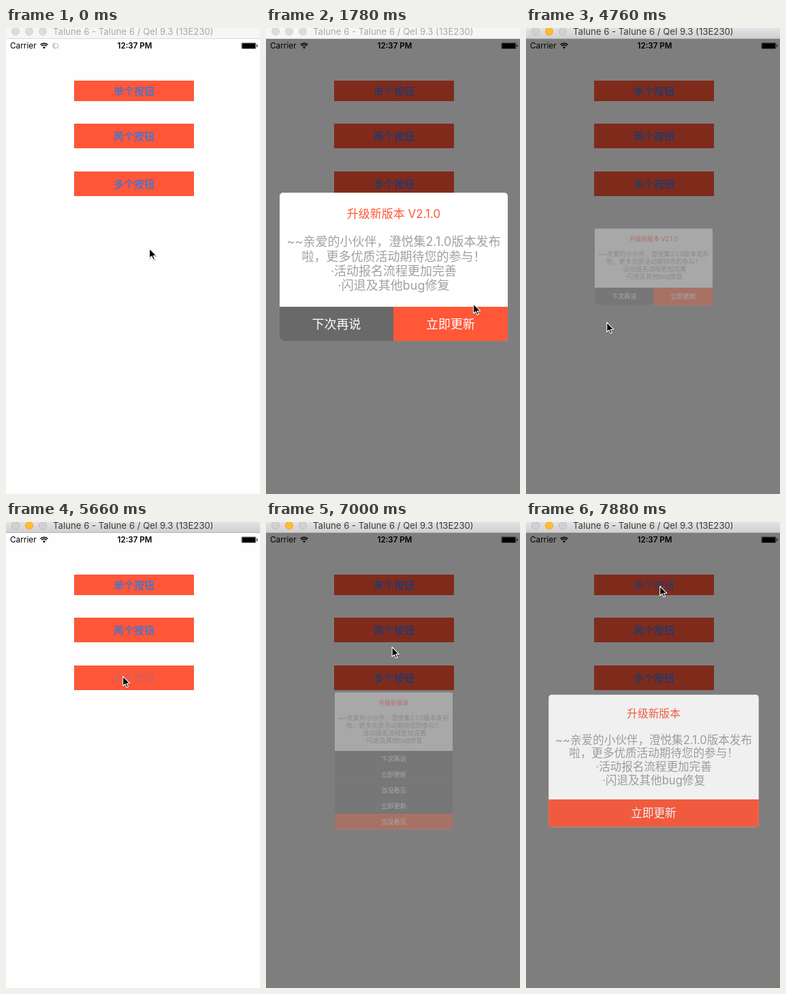
An HTML page for the animation above (8000 ms loop, 373 px wide and 682 px high).

```html
<!DOCTYPE html>
<html lang="zh-CN">
<head>
<meta charset="utf-8">
<style>
  html, body { margin: 0; width: 100%; height: 100%; overflow: hidden; background: #fefefe; }
  svg { display: block; font-family: Inter, "Noto Sans CJK SC", "Noto Sans CJK", sans-serif; }
</style>
</head>
<body>
<svg id="stage" width="373" height="682" viewBox="0 0 373 682"></svg>
<script>
const LOOP = 8000, TICKS = 54, TICK = 148.68;
const RED = '#ff5738', GREY = '#696969', TITLE = '升级新版本';
const LATER = '下次再说', UPDATE = '立即更新', IGNORE = '当没看见';
const stage = document.getElementById('stage');

// Each menu button opens its dialog at one tick; the dialog shrinks away at another.
const items = [
  { label: '单个按钮', y: 77, h: 30, open: 52, close: TICKS, title: TITLE, options: [UPDATE] },
  { label: '两个按钮', y: 140, h: 36, open: 5, close: 32, title: TITLE + ' V2.1.0', options: [LATER, UPDATE] },
  { label: '多个按钮', y: 210, h: 36, open: 39, close: 47, title: TITLE, options: [LATER, UPDATE, IGNORE, UPDATE, IGNORE] }
];
const body = ['~~亲爱的小伙伴，澄悦集2.1.0版本发布', '啦，更多优质活动期待您的参与！',
  '·活动报名流程更加完善', '·闪退及其他bug修复'];

// Pointer stops: arrival tick, x, y. It rests at each and glides for at most four ticks.
const stops = [
  [0, 210, 322], [4, 190, 160], [8, 225, 350], [12, 304, 403], [15, 75, 452], [18, 160, 420],
  [21, 122, 431], [23, 144, 431], [26, 118, 430], [38, 171, 225], [45, 180, 340],
  [48, 186, 127], [51, 196, 93]
];

const clamp = (v, lo = 0, hi = 1) => Math.min(hi, Math.max(lo, v));
const smooth = u => (u = clamp(u), u * u * (3 - 2 * u));
const rect = (x, y, w, h, fill, more = '') =>
  `<rect x="${x}" y="${y}" width="${w}" height="${h}" fill="${fill}" ${more}/>`;
const text = (s, x, y, size, fill, more = 'text-anchor="middle"') =>
  `<text x="${x}" y="${y}" font-size="${size}" fill="${fill}" ${more}>${s}</text>`;

function titleBar(active) {
  let lights = '';
  for (let i = 0; i < 3; i++) {
    const [fill, edge] = !active ? ['#dcdcdc', '#d0d0d0'] : i == 1 ? ['#ffbd2e', '#e0a028'] : ['#d2d0d2', '#b9b7b9'];
    lights += `<circle cx="${14 + 20 * i}" cy="5" r="5.6" fill="${fill}" stroke="${edge}" stroke-width=".8"/>`;
  }
  return `<linearGradient id="bar" x2="0" y2="1"><stop stop-color="#e4e2e4"/><stop offset="1" stop-color="#d0ced0"/></linearGradient>`
    + rect(0, 0, 373, 16, active ? 'url(#bar)' : '#f6f6f6')
    + rect(0, 15, 373, 1, active ? '#b8b6b8' : '#dadada') + lights
    + text('Talune 6 - Talune 6 / Qel 9.3 (13E230)', 69, 10, 13.2, active ? '#3c3c3c' : '#a8a8a8', '');
}

function statusBar(n) {
  let icons = '';
  for (let i = 0; i < 3; i++) {
    const r = 2.6 + 2.5 * i, d = r * .72;
    const arc = `${56 - d} ${30 - d}A${r} ${r} 0 0 1 ${56 + d} ${30 - d}`;
    icons += i ? `<path d="M${arc}" fill="none" stroke="#000" stroke-width="1.6"/>` : `<path d="M56 30.6L${arc}Z"/>`;
  }
  if (n < 5) for (let i = 0; i < 8; i++)
    icons += `<path d="M0 -2.4V-4.8" stroke="#444" stroke-width="1.1" opacity="${.25 + (i - n + 8) % 8 * .09}"
      transform="translate(73 26) rotate(${i * 45})"/>`;
  return text('Carrier', 6, 30.4, 11.8, '#000', '') + icons
    + text('12:37 PM', 189, 30.4, 11.6, '#000', 'text-anchor="middle" font-weight="600"')
    + rect(345.5, 21.5, 22, 9, 'none', 'rx="1.5" stroke="#000" stroke-width=".7" stroke-opacity=".4"')
    + rect(346.5, 22.2, 20, 7.7, '#000', 'rx=".6"') + rect(368.3, 24.3, 1.2, 3.4, '#000', 'rx=".6"');
}

function menuButton({ label, y, h, open }, n) {
  // The label dims while pressed and recovers as the dialog opens.
  const alpha = n < open - 1 ? 1 : clamp(.2 + .6 * (n - open), .2);
  return rect(100, y, 176, h, RED)
    + text(label, 188, y + h / 2 + 5.6, 15, '#147aff', `text-anchor="middle" opacity="${alpha}"`);
}

function dialog({ open, close, title, options }, n) {
  const p = n < close ? smooth((n - open + .59) / 2) : .33;
  const count = options.length, split = count == 2;
  const rowH = split ? 50 : 44.3, top = split ? 167 : 166;
  const h = top + rowH * (split ? 1 : count);
  const rows = options.map((label, i) => {
    const x = split ? 167 * i : 0, y = split ? top : top + rowH * i, w = split ? 167 + i : 335;
    return rect(x, y, w, rowH, i == count - 1 ? RED : GREY, 'shape-rendering="crispEdges"')
      + text(label, x + w / 2, y + rowH / 2 + 6.6, 18, '#fff');
  }).join('');
  const line = count > 2 ? rect(0, top + 2 * rowH - .4, 335, .8, '#8f8f8f') : '';
  return rect(0, 16, 373, 666, '#000', 'opacity=".5"')
    + `<clipPath id="round">${rect(0, 0, 335, h, '#000', 'rx="5"')}</clipPath>
    <g opacity="${p}" transform="translate(187.5 349.5) scale(${.28 + .72 * p}) translate(-167.5 ${-h / 2})">
    <g clip-path="url(#round)">${rect(0, 0, 335, h, '#fff')}
    ${text(title, 167.5, 36.6, 17, RED)}
    ${body.map((s, i) => text(s, 167.5, 78.2 + 21.3 * i, 18, '#a0a0a0')).join('')}
    ${rows}${line}</g></g>`;
}

function pointer(n) {
  let [, x, y] = stops[0], left = 0;
  for (const [arrive, tx, ty] of stops) {
    const start = Math.max(left, arrive - 4);
    const u = smooth((n - start) / (arrive - start || 1));
    x += (tx - x) * u;
    y += (ty - y) * u;
    left = arrive;
  }
  const shape = 'M.7 .8V15L4 12L6.3 17.2L8.6 16.2L6.3 11.2H10.8Z';
  return `<g transform="translate(${x} ${y})">
    <path d="${shape}" transform="translate(.4 1)" opacity=".2" stroke="#000" stroke-width="1.6"/>
    <path d="${shape}" stroke="#fff" stroke-width="1.1" stroke-linejoin="round"/></g>`;
}

function scene(n) {
  const shown = items.find(d => n >= d.open && n <= d.close);
  return rect(0, 0, 373, 682, '#fefefe') + statusBar(n)
    + items.map(d => menuButton(d, n)).join('')
    + (shown ? dialog(shown, n) : '') + titleBar(n >= 28) + pointer(n);
}

let last = -1;
function frame() {
  const n = Math.min(TICKS - 1, Math.floor((performance.now() % LOOP + 10) / TICK));
  if (n != last) stage.innerHTML = scene(last = n);
  requestAnimationFrame(frame);
}
frame();
</script>
</body>
</html>
```
